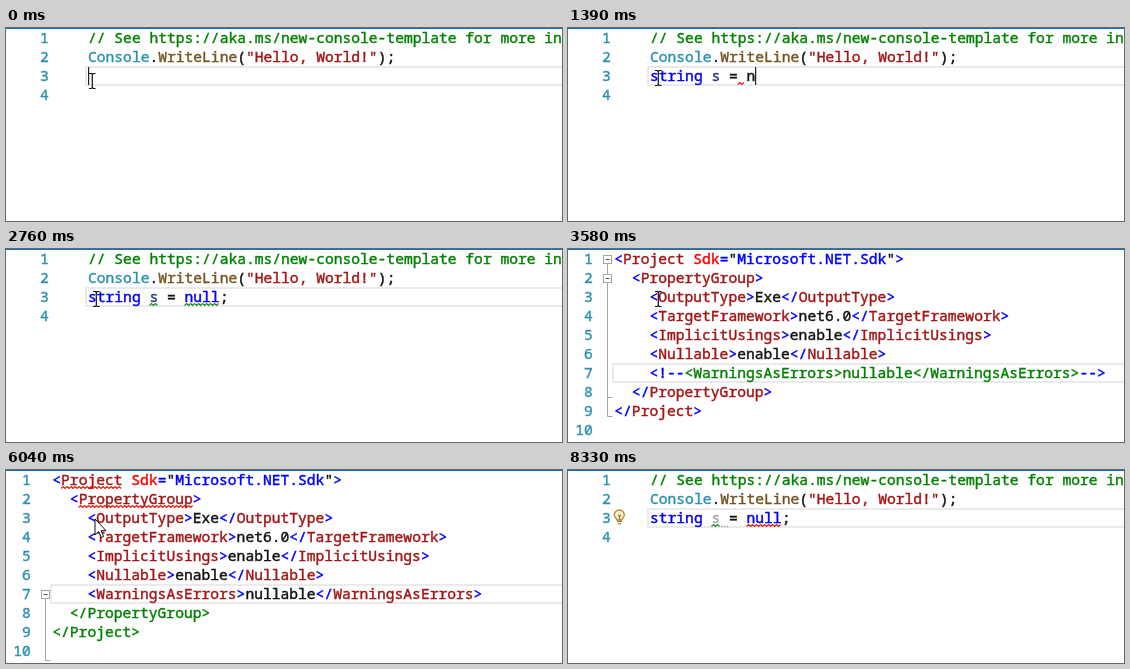
Animation, 556 px wide and 193 px high, one loop 8400 ms. Source, as an HTML page:

```html
<!DOCTYPE html>
<html lang="en">
<head>
<meta charset="utf-8">
<title>Nullable warnings as errors</title>
<style>
html, body { margin: 0; width: 556px; height: 193px; overflow: hidden; background: #fff; }
svg { display: block; }
text { white-space: pre; }
.code { font: 500 14.63px "Noto Sans Mono", monospace; font-kerning: none; font-variant-ligatures: none; stroke-width: .42px; }
.ui { font: 11.2px "Open Sans", sans-serif; }
</style>
</head>
<body>
<svg id="stage" width="556" height="193" viewBox="0 0 556 193"></svg>
<script>
const LOOP = 8400, CH = 8.78, ROW = 19;
const CODE_X = 82, XML_X = 46.3;
const C = {
  text: '#111', keyword: '#0000ff', comment: '#008000', type: '#2b91af', method: '#74531f',
  string: '#a31515', local: '#1f377f', attr: '#ff0000', faded: '#a5a5a5', error: '#e51400', warn: '#168a16'
};
const stage = document.getElementById('stage');
const esc = s => s.replace(/&/g, '&amp;').replace(/</g, '&lt;');
const span = (s, color) => `<tspan fill="${C[color]}" stroke="${C[color]}">${esc(s)}</tspan>`;
const rect = (x, y, w, h, fill, extra = '') =>
  `<rect x="${x}" y="${y}" width="${w}" height="${h}" fill="${fill}" ${extra}/>`;
const path = (d, stroke, width = 1, fill = 'none', extra = '') =>
  `<path d="${d}" stroke="${stroke}" stroke-width="${width}" fill="${fill}" ${extra}/>`;
const line = (n, x, spans) => `<text class="code" x="${x}" y="${15 + ROW * (n - 1)}">${spans}</text>`;

function squiggle(x, n, cols, color) {
  const y = 17.5 + ROW * (n - 1);
  let d = `M${x} ${y + 1}`;
  for (let i = 1; i * 2 <= cols * CH; i++) d += `L${x + i * 2} ${y + (i % 2 ? -1 : 1)}`;
  return path(d, C[color], 1.1);
}

// Line numbers are right-aligned; x is the place of the last digit.
function gutter(count, x) {
  let out = '';
  for (let n = 1; n <= count; n++) {
    const s = String(n);
    out += line(n, x - CH * (s.length - 1), span(s, 'type'));
  }
  return out;
}

const currentRow = (n, x) =>
  rect(x, 39 + ROW * (n - 3), 560 - x, 18, 'none', 'stroke="#e9e9ee" stroke-width="2"');
const caret = (x, n) => rect(Math.floor(x), 39 + ROW * (n - 3), 1.2, 18, '#222');

// ---- completion list ----
const GREY = '#bcbcbc';
const icons = {
  key: path('M-6 -4.5h5M2 -4.5h4M-6 -1.5h3M-6 1.5h12M-6 4.5h7', '#333', 1.4) + path('M-1 -1.5h7', '#0067b8', 1.4),
  cls: path('M-6 -2l4 -4 3 3 -4 4zM2 -1.500l2 -2 2 2 -2 2zM1 4l2 -2 2 2 -2 2zM0 -1.500h2M-1 -1v5h2', '#b8862b', 1.3, '#f7e7c0'),
  val: rect(-1, -5, 7, 6, '#0b5fae') + rect(-6, -1, 8, 6, '#0b5fae', 'stroke="#f5f5f5" stroke-width=".8"'),
  aim: path('M-6 -3v-3h3M3 -6h3v3M6 3v3h-3M-3 6h-3v-3', '#333', 1.2) + path('M-4 0h8M0 -4v8', '#2a8a2a', 1.4),
  brace: `<text class="ui" x="-7" y="4" fill="${GREY}">{ }</text>`,
  link: `<circle cx="-5" r="2.3" fill="none" stroke="${GREY}"/><circle cx="4" r="3" fill="none" stroke="${GREY}"/>` + path('M-2.500 0h3.500', GREY),
  box: rect(-5, -4, 10, 9, 'none', `stroke="${GREY}"`) + path('M-5 -1h10M0 -1v6', GREY),
  cube: path('M-5 -3l5 -3 5 3v6l-5 3 -5 -3zl5 3 5 -3M0 0v6', GREY),
  tag: path('M-5 1l6 -6 4 4 -6 6z', GREY)
};
const icon = (kind, x, y) => `<g transform="translate(${x} ${y}) scale(1.15)">${icons[kind]}</g>`;

const lists = {
  string: {
    col: 0,
    items: ['key string', 'cls String', 'cls StringComparer', 'val StringComparison', 'cls StringReader', 'cls StringWriter'],
    filters: 'aim brace cls val link box tag cube key'
  },
  null: {
    col: 11,
    items: ['key null', 'cls Nullable', 'val Nullable<>', 'cls NullReferenceException', 'cls ArgumentNullException', 'cls DBNull'],
    filters: 'aim brace cls val link box box tag cube box key box'
  }
};

function label(name, typed) {
  const i = name.toLowerCase().indexOf(typed), j = i + typed.length;
  return i < 0 ? esc(name)
    : `${esc(name.slice(0, i))}<tspan font-weight="700">${name.slice(i, j)}</tspan>${esc(name.slice(j))}`;
}

function popup(name, typed) {
  const list = lists[name], filters = list.filters.split(' ');
  const x = Math.round(CODE_X + list.col * CH), w = filters.length * 28 + 4;
  let out = rect(x + .5, 60.5, w - 1, 140, '#f5f5f5', 'stroke="#dcdde2"') + rect(x + 20, 62, w - 22, 18, '#0070c4');
  list.items.forEach((item, i) => {
    const [kind, text] = item.split(' '), y = 71 + ROW * i;
    out += icon(kind, x + 9.5, y)
      + `<text class="ui" x="${x + 22}" y="${y + 4}" fill="${i ? '#1e1e1e' : '#fff'}">${label(text, typed)}</text>`;
  });
  filters.forEach((kind, i) => out += icon(kind, x + 14 + i * 28 + (i ? 3 : 0), 189));
  return out;
}

// ---- the two documents ----
function statement(s) {
  const m = s.text.match(/^(\w*)( ?)(\w?)(.*)$/);
  const word = s.text.slice(11);
  const tail = word.startsWith('null')
    ? span(' = ', 'text') + span('null', 'keyword') + span(word.slice(4), 'text') : span(m[4], 'text');
  return span(m[1], m[1] === 'string' ? 'keyword' : 'text') + m[2] + span(m[3], s.faded ? 'faded' : 'local') + tail;
}

const bulb = path('M49 50c0 -2 -2.7 -2.3 -2.7 -5a5 5 0 0 1 10 0c0 2.7 -2.7 3 -2.7 5z', '#b8862b', 1.3, '#fdf3d6')
  + path('M49 51.5h5M50 53.7h3M50 45l1.5 1.5 1.5 -1.5M51.5 46.5v3', '#8d6a25', 1.1);

function program(s) {
  let out = currentRow(3, 80) + gutter(4, 34)
    + line(1, CODE_X, span('// See https://aka.ms/new-console-template for more information', 'comment'))
    + line(2, CODE_X, span('Console', 'type') + span('.', 'text') + span('WriteLine', 'method') + span('(', 'text')
      + span('"Hello, World!"', 'string') + span(');', 'text'))
    + line(3, CODE_X, statement(s));
  for (const [col, cols, color] of s.marks) out += squiggle(CODE_X + col * CH, 3, cols, color);
  if (s.dots) out += path('M153 56.5h7', C.faded, 1.5, 'none', 'stroke-dasharray="1.5 1.5"');
  if (s.bulb) out += bulb;
  if (s.caret) out += caret(CODE_X + s.text.length * CH, 3);
  if (s.list) out += popup(s.list, s.text.slice(lists[s.list].col));
  return out;
}

const xmlHead = [
  '<Project Sdk="Microsoft.NET.Sdk">',
  '  <PropertyGroup>',
  '    <OutputType>Exe</OutputType>',
  '    <TargetFramework>net6.0</TargetFramework>',
  '    <ImplicitUsings>enable</ImplicitUsings>',
  '    <Nullable>enable</Nullable>'
];
const setting = '<WarningsAsErrors>nullable</WarningsAsErrors>';

function xml(src) {
  return src.replace(/(<\/?)(\w+)|( \w+)(=)"([^"]*)"|>|[^<>]+?(?=[<>]|$)/g, (all, open, name, attr, eq, value) => {
    if (open) return span(open, 'keyword') + span(name, 'string');
    if (attr) return span(attr, 'attr') + span(eq, 'keyword') + span('"', 'text') + span(value, 'keyword') + span('"', 'text');
    return span(all, all === '>' ? 'keyword' : 'text');
  });
}

const foldBox = n => rect(35.5, 6.5 + ROW * (n - 1), 8, 8, '#fff', 'stroke="#a5a5a5"')
  + path(`M37.5 ${10.5 + ROW * (n - 1)}h4`, '#555');

function folds(kind) {
  if (kind === 'tree') return path('M39.5 14V167.5h5M39.5 148.5h5', '#a5a5a5') + foldBox(1) + foldBox(2);
  if (kind === 'open') return path('M39.5 129V190.5h5', '#a5a5a5') + foldBox(7);
  return '';
}

function project(s) {
  let out = currentRow(7, 45) + gutter(10, 16) + folds(s.fold);
  xmlHead.forEach((src, i) => out += line(i + 1, XML_X, xml(src)));
  const body = s.plain ? xml(setting) : span(setting, 'comment');
  out += line(7, XML_X, '    ' + span(s.head, 'keyword') + body + span(s.tail, 'keyword'));
  ['  </PropertyGroup>', '</Project>'].forEach((src, i) =>
    out += line(8 + i, XML_X, s.broken ? span(src, 'comment') : xml(src)));
  if (s.broken) out += squiggle(XML_X + CH, 1, 7, 'error') + squiggle(XML_X + 3 * CH, 2, 13, 'error');
  if (s.caret) {
    const col = s.home ? 4 : 4 + s.head.length + setting.length + s.tail.length;
    out += caret(XML_X + col * CH, 7);
  }
  return out;
}

function pointer([x, y, arrow]) {
  return arrow
    ? path(`M${x} ${y}v16l3.7 -3.5 2.6 6 2.4 -1 -2.6 -5.8h5z`, '#111', 1, '#fff')
    : path(`M${x - 3} ${y - 7.5}h2.3l1 1 1 -1h2.3M${x + .3} ${y - 6.5}v13M${x - 3} ${y + 7.5}h2.3l1 -1 1 1h2.3`, '#111', 1.2);
}

// ---- timeline: each entry changes part of the state ----
const start = {
  doc: 'program', text: '', caret: 1, marks: [], mouse: [86, 53], list: '', bulb: 0, faded: 0, dots: 0,
  head: '<!--', tail: '-->', fold: '', plain: 0, broken: 0, home: 0
};
const type = (text, more) => ({ text, caret: 1, ...more });
const on = { caret: 1 }, off = { caret: 0 };
const full = 'string s = null;';
const warnings = [[7, 1, 'warn'], [11, 4, 'warn']];
const steps = [
  [70, type('s', { mouse: [90, 50] })], [150, { list: 'string' }],
  [220, type('st')], [300, type('str')], [370, type('stri')], [450, type('strin')], [520, type('string')],
  [660, type('string ', { list: '' })], [730, { marks: [[0, 1.1, 'error']] }],
  [860, type('string s')],
  [1120, type('string s ', { marks: [] })], [1200, type('string s =')],
  [1270, type('string s = ', { marks: [[10, 0.9, 'error']] })],
  [1350, type('string s = n')], [1430, { list: 'null' }], [1500, type('string s = nu')],
  [1580, type('string s = nul')], [1660, type('string s = null')],
  [1820, type(full, { list: '' })], [1910, { marks: [] }],
  [2110, off], [2440, on], [2760, { caret: 0, marks: warnings }], [2840, { bulb: 1 }], [3040, on],
  [3180, { doc: 'project', caret: 0 }], [3270, { fold: 'tree', caret: 1 }],
  [3580, off], [3900, on],
  [4100, { tail: '--' }], [4200, { tail: '-' }], [4290, { tail: '' }],
  [4620, off], [4820, { caret: 1, home: 1 }],
  [5080, { head: '!--' }], [5150, { head: '--', broken: 1, fold: 'open' }],
  [5220, { head: '-' }], [5280, { head: '' }],
  [5560, { plain: 1 }], [5830, off], [6040, { mouse: [89, 49, 1] }],
  [6110, { doc: 'program', caret: 1, bulb: 0 }], [6240, { bulb: 1, mouse: [90, 50] }],
  [6430, { caret: 0, mouse: [118, 56] }], [6510, { mouse: [198, 72] }], [6590, { mouse: [290, 88] }],
  [6670, { mouse: [384, 98] }], [6760, { caret: 1, mouse: null }],
  [7090, off], [7420, on],
  [7610, { faded: 1 }], [7680, { caret: 0, dots: 1, marks: [[7, 1, 'warn'], [11, 4, 'error']] }],
  [8010, on], [8330, off]
];

let shown = -1;
function draw(t) {
  const count = steps.filter(([at]) => at <= t).length;
  if (count === shown) return;
  shown = count;
  const s = Object.assign({}, start, ...steps.slice(0, count).map(step => step[1]));
  stage.innerHTML = rect(0, 0, 556, 193, '#fff') + (s.doc === 'program' ? program(s) : project(s))
    + rect(0, 0, 556, 1, '#0f6fc0') + (s.mouse ? pointer(s.mouse) : '');
}

const t0 = performance.now();
function tick() {
  draw((performance.now() - t0) % LOOP);
  requestAnimationFrame(tick);
}
tick();
</script>
</body>
</html>
```
